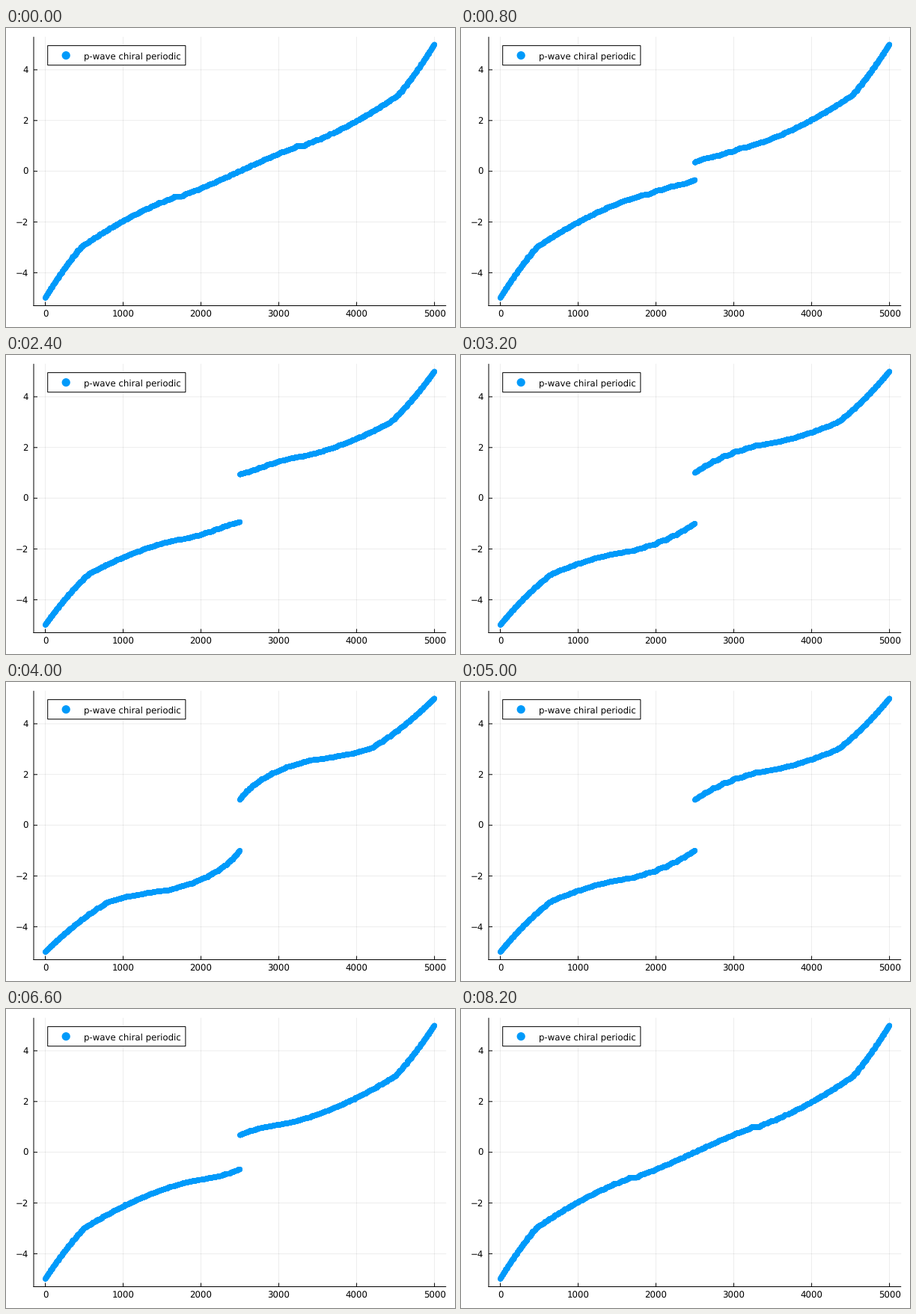
A matplotlib script for the animation above (8.4 s loop, 600 by 400 pixels).

```python
import numpy as np
import matplotlib.pyplot as plt
from matplotlib.animation import FuncAnimation
from matplotlib.patches import Circle, Rectangle

W, H, DPI = 600, 400, 100
PX = 72 / DPI                      # one pixel in points
BLUE = "#009AFA"
L, R, T, B = 37.0, 588.2, 11.8, 371.5
SITES = 50                         # lattice is SITES x SITES, periodic
STEPS = 20                         # pairing rises from 0 to 2 and back
N = 2 * SITES ** 2
X_LOW, X_HIGH = 1 - 0.03 * (N - 1), N + 0.03 * (N - 1)
Y_MAX = 5.3


def to_x(v):
    return L + (v - X_LOW) * (R - L) / (X_HIGH - X_LOW)


def to_y(v):
    return (T + B) / 2 - v * (B - T) / (2 * Y_MAX)


k = 2 * np.pi * np.arange(SITES) / SITES
kx, ky = np.meshgrid(k, k)
xi = (2 * (np.cos(kx) + np.cos(ky)) + 1).ravel()
gap_shape = (np.sin(kx) ** 2 + np.sin(ky) ** 2).ravel()


def spectrum(delta):
    """Sorted energies of the chiral p-wave superconductor."""
    e = np.sqrt(xi ** 2 + delta ** 2 * gap_shape)
    return np.sort(np.concatenate([-e, e]))


plt.rcParams["font.family"] = "DejaVu Sans"
plt.rcParams["text.hinting"] = "none"
fig = plt.figure(figsize=(W / DPI, H / DPI), dpi=DPI, facecolor="white")
ax = fig.add_axes([0, 0, 1, 1])
ax.set_xlim(0, W)
ax.set_ylim(H, 0)
ax.axis("off")


def line(xs, ys, width=1, z=2, **kw):
    ax.plot(xs, ys, color="black", lw=width * PX, zorder=z,
            solid_capstyle="butt", snap=False, **kw)


def label(x, y, text, ha):
    ax.text(x, y, text, fontsize=8.5, ha=ha, va="baseline", zorder=6)


for v in range(0, 5001, 1000):
    x = to_x(v)
    line([x, x], [T, B], 0.69, 1, alpha=0.1)
    line([x, x], [B, B - 5])
    label(x, 387.3, str(v), "center")

for v in range(-4, 5, 2):
    y = to_y(v)
    line([L, R], [y, y], 0.69, 1, alpha=0.1)
    line([L, L + 5], [y, y])
    label(29.7, y + 4.3, str(v).replace("-", "\u2212"), "right")

line([L, L], [T, B + 0.5])
line([L - 0.5, R], [B, B])

# Per-point sizes keep the markers at sub-pixel positions.
index_x = to_x(np.arange(1, N + 1))
dots = ax.scatter(index_x, to_y(spectrum(0)), s=np.full(N, (7 * PX) ** 2),
                  c=BLUE, linewidths=0, zorder=3)

ax.add_patch(Rectangle((55.7, 23.6), 184.2, 26.1, fc="white", ec="black",
                       lw=PX, zorder=4, snap=False))
ax.add_patch(Circle((80.2, 36.7), 5.6, fc=BLUE, lw=0, zorder=5))
label(103.5, 41.2, "p-wave chiral periodic", "left")


def draw(i):
    step = i if i <= STEPS else 2 * STEPS + 1 - i
    energy = spectrum(0.1 * step)
    dots.set_offsets(np.column_stack([index_x, to_y(energy)]))
    return [dots]


anim = FuncAnimation(fig, draw, frames=2 * STEPS + 2, interval=200,
                     init_func=lambda: draw(0), repeat=True, repeat_delay=0)
plt.show()
```
